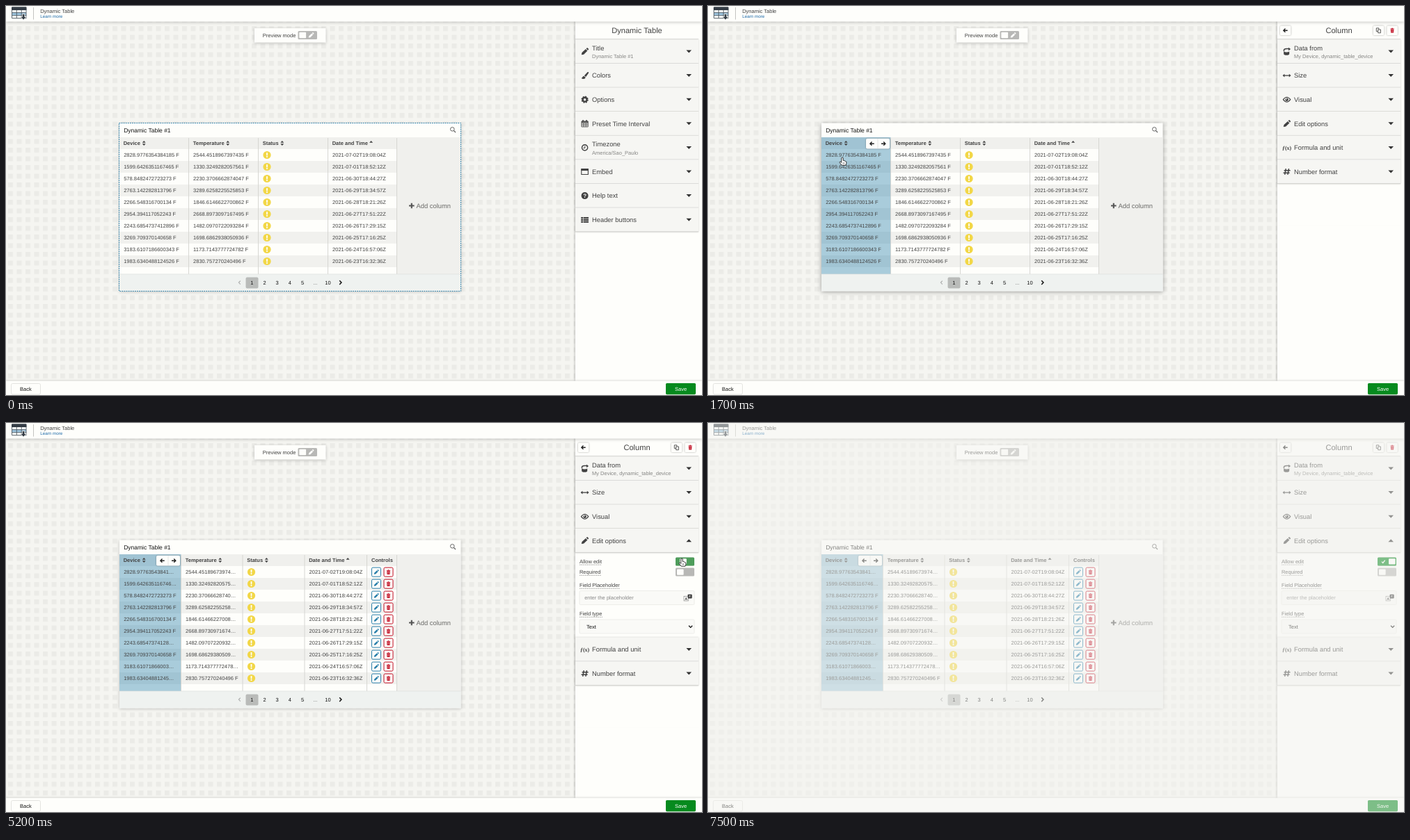
Recreate the animation shown at these times as an HTML page. Size 1000 px wide and 560 px high, loop 8 s.

```html
<!DOCTYPE html>
<html lang="en">
<head>
<meta charset="utf-8">
<title>Dynamic Table</title>
<style>
html, body { margin: 0; width: 100%; height: 100%; overflow: hidden; background: #fefefb; }
svg { display: block; width: 100vw; height: 100vh; }
text { font-family: "Liberation Sans", Arial, sans-serif; text-rendering: geometricPrecision; white-space: pre; }
.soft { filter: drop-shadow(0 1px 2px rgba(0,0,0,.22)); }
.lift { filter: drop-shadow(0 1px 3px rgba(0,0,0,.38)); }
.rows { filter: drop-shadow(0 .8px 1px rgba(0,0,0,.2)); }
.side { filter: drop-shadow(-1px 0 1.5px rgba(0,0,0,.2)); }
.btn { filter: drop-shadow(0 0 .8px rgba(0,0,0,.35)); }
</style>
</head>
<body>
<svg viewBox="0 0 1000 560" preserveAspectRatio="none">
  <defs>
    <pattern id="grid" x="3" y="4" width="12.5" height="12.5" patternUnits="userSpaceOnUse">
      <rect width="12.5" height="12.5" fill="#f5f5f1"/>
      <rect width="7" height="7" fill="#ebebe7"/>
    </pattern>
  </defs>
  <g id="scene"></g>
</svg>
<script>
const LOOP = 8000, STEP = 100;
const INK = '#424242', WHITE = '#fefefb', GREY = '#f0f0ed', ROW = '#f6f6f3';
const BLUE = '#297faa', RED = '#c00a20', GREEN = '#068a1e';

// Drawing helpers
const rect = (x, y, w, h, fill, more = '') =>
  `<rect x="${x}" y="${y}" width="${w}" height="${h}" fill="${fill}" ${more}/>`;
const text = (x, y, s, size = 7.5, fill = INK, more = '') =>
  `<text x="${x}" y="${y}" font-size="${size}" fill="${fill}" ${more}>${s}</text>`;
const fillPath = (d, fill = INK, more = '') => `<path d="${d}" fill="${fill}" ${more}/>`;
const line = (d, color = INK, width = 1, more = '') =>
  `<path d="${d}" fill="none" stroke="${color}" stroke-width="${width}" ${more}/>`;
const ring = (r, width, more = '') =>
  `<circle r="${r}" fill="none" stroke="${INK}" stroke-width="${width}" ${more}/>`;
const at = (x, y, body, scale = 1) =>
  `<g transform="translate(${x} ${y}) scale(${scale})">${body}</g>`;
const range = n => [...Array(n).keys()];
const BOLD = 'font-weight="700"', MID = 'text-anchor="middle"';

// Icons, each centred on 0,0
const pencil = (c = INK) =>
  fillPath('M-4.8 4.8l.7-3.2L1.3-3.4 3.8-.9l-5.2 5.1zM2-4.1l.8-.8q.7-.6 1.4 0l1 1q.6.7 0 1.4l-.8.8z', c);
const trash = (c = RED) =>
  fillPath('M-4-4h2.2l.6-1h2.4l.6 1H4v1.3h-8zM-3.4-2h6.8l-.5 7h-5.8z', c) +
  line('M-1.2-.6v4M1.2-.6v4', WHITE, .7);
const arrow = dir => line(`M${-3 * dir} 0H${2.6 * dir}M${.2 * dir}-2.6L${2.8 * dir} 0 ${.2 * dir} 2.6`, '#222', 1.4);
const icon = {
  pencil: pencil(),
  brush: fillPath('M5-5q1 .4.3 1.6L1.6 2-.8.2 3.8-4.8q.6-.5 1.2-.2zM-1.3.8L1 2.5Q.8 5-2 5q-2 0-3-1.4 1.5 0 1.8-1.4.4-1.4 1.9-1.4z'),
  gear: ring(2.9, 2.4) + ring(4.3, 1.7, 'stroke-dasharray="1.9 1.477"'),
  calendar: line('M-4.6-3.4h9.2v8h-9.2zM-4.6-.9h9.2M-4.6 1.8h9.2M-1.6-1v5.6M1.6-1v5.6', INK, .9) +
    line('M-4.6-2.6h9.2M-2.5-5.2v2M2.5-5.2v2', INK, 1.5),
  clock: ring(4.1, 1.4) + line('M.2-2.4V.6H-2', INK, 1),
  frame: line('M-4.8-3.8h9.6v7.8h-9.6z', INK, 1.1) + rect(-5.2, -4.4, 10.4, 3, INK),
  help: `<circle r="5" fill="${INK}"/>` + text(0, 2.9, '?', 8, WHITE, `${MID} ${BOLD}`),
  list: [-3.8, -.9, 2].map(y => rect(-5.4, y, 2.8, 2.2, INK) + rect(-2, y, 7.4, 2.2, INK)).join(''),
  data: fillPath('M-4.4-1.2v4.6q0 1.8 4 1.8t4-1.8V0q-2 1.4-5 1t-3-2.2z') +
    line('M-4-.8Q-5-4 0-4H3.6', INK, 1.7) + fillPath('M2.4-5.8L5.6-3.4 2.4-1.2z'),
  wide: line('M-4 0H4', INK, 1.3) + fillPath('M-6 0l2.8-2.4v4.8zM6 0L3.2-2.4v4.8z'),
  eye: line('M-5.2 0Q0-7 5.2 0 0 7-5.2 0z', INK, 1.1) +
    `<circle r="2.3" fill="${INK}"/><circle cx="-.7" cy="-.8" r=".8" fill="${WHITE}"/>`,
  fx: text(0, 2.6, '<tspan font-style="italic">ƒ</tspan>(x)', 8, INK, `${MID} style="font-family:'Liberation Serif',serif" ${BOLD}`),
  hash: line('M-1.3-4.4l-1.6 8.8M2.9-4.4L1.3 4.4M-4-1.7H5M-5 1.7H4', INK, 1.5),
  warn: '<circle r="5.6" fill="#f2d747"/>' + rect(-.9, -3.6, 1.8, 4.5, WHITE, 'rx=".7"') +
    `<circle cy="2.6" r="1.05" fill="${WHITE}"/>`
};
const sortIcon = (x, both) => fillPath(`M${x} 196.7h5l-2.5-2.7z`) + (both ? fillPath(`M${x} 198.2h5l-2.5 2.7z`) : '');
const caret = (y, up) => fillPath(up ? `M977.4 ${y + 2}h7.6l-3.8-4z` : `M977.4 ${y - 2}h7.6l-3.8 4z`, '#333');

// Table data
const devices = ('2828.9776354384185 1599.6426351167465 578.8482472723273 2763.142282813796 2266.548316700134 ' +
  '2954.394117052243 2243.6854737412896 3269.709370140658 3183.6107186600343 1983.6340488124526').split(' ');
const temps = ('2544.4518967397435 1330.3249282057561 2230.3706662874047 3289.6258225525853 1846.6146622700862 ' +
  '2668.8973097167495 1482.0970722093284 1698.6862938050936 1173.7143777724782 2830.757270240496').split(' ');
const dates = ('07-02T19:08:04 07-01T18:52:12 06-30T18:44:27 06-29T18:34:57 06-28T18:21:26 ' +
  '06-27T17:51:22 06-26T17:29:15 06-25T17:16:25 06-24T16:57:06 06-23T16:32:36').split(' ');

// The narrow layout cuts long values; a kerned "11" leaves room for one more digit
const value = (s, narrow) => {
  const full = s + ' F';
  return narrow && full.length > 19 ? full.slice(0, full.includes('11') ? 17 : 16) + '…' : full;
};

function table(t, tint) {
  const narrow = t >= 5200, picked = t >= 1600;
  const seps = narrow ? [251.5, 340, 429, 518.5] : [262.5, 362.5, 462.5];
  const [x1, x2, x3] = seps;
  let s = rect(163, 168.5, 490.5, 242, WHITE, `class="${picked && t < 2200 ? 'lift' : 'soft'}"`);
  s += rect(163, 189, 398.5, 17, GREY);
  s += range(5).map(i => rect(163, 223 + i * 34, 398.5, 17, '#f1f1ee')).join('');
  if (tint) s += rect(163, 189, x1 - 163, 197, BLUE, `opacity="${tint}"`);
  s += rect(561.5, 189, 92, 197, GREY) + rect(163, 386, 490.5, 24.5, '#eff2f0');
  s += line([...seps, 561.5].map(x => `M${x} 190V386`).join(''), '#d3d3cf', .9);
  s += line('M163 386H653.5', '#dcdedb', .7);

  s += text(169.2, 181.6, 'Dynamic Table #1', 8.5, '#111');
  s += at(642, 178, line('M1.5 1.5L4 4', '#666', 1.3) + '<circle cx="-.7" cy="-.7" r="2.8" fill="none" stroke="#666"/>');
  const head = (x, label, dx, both) => text(x, 200, label, 7.5, INK, BOLD) + (dx ? sortIcon(x + dx, both) : '');
  s += head(168.7, 'Device', 27, true) + head(x1 + 6.2, 'Temperature', 47.5, true) +
    head(x2 + 6.2, 'Status', 25.6, true) + head(x3 + 6.2, 'Date and Time', 53.4, false);
  if (narrow) s += head(525, 'Controls');

  s += range(10).map(i => {
    const y = 214.3 + i * 17, base = y + 2.6;
    let r = text(169.2, base, value(devices[i], narrow)) + text(x1 + 6.6, base, value(temps[i], narrow)) +
      at(x2 + 12.5, y + .2, icon.warn) + text(x3 + 6.6, base, `2021-${dates[i]}Z`);
    if (narrow) {
      const box = (x, color, glyph) =>
        rect(x, y - 6.2, 13, 13, WHITE, `rx="1.6" stroke="${color}"`) + at(x + 6.5, y + .3, glyph, .68);
      r += box(525.5, BLUE, pencil(BLUE)) + box(543, RED, trash());
    }
    return r;
  }).join('');

  if (picked) {
    const x = x1 - 35.5;
    s += rect(x, 190.7, 34, 14.8, WHITE, 'rx="2" class="btn"') + line(`M${x + 17} 191V205`, '#ddd', .7) +
      at(x + 8.7, 198.2, arrow(-1)) + at(x + 25, 198.2, arrow(1));
  }

  s += line('M579 287.5h7.6M582.8 283.7v7.6', '#555', 2.1) + text(589.5, 290.6, 'Add column', 9.375, '#6a6a68');
  s += rect(344.5, 390.5, 18, 16, '#b9bbb9', 'rx="2"');
  s += ['1', '2', '3', '4', '5', '...', '10'].map((p, i) =>
    text(353.3 + i * 18.2, 401, p, 7.5, i === 5 ? '#666' : '#111', MID)).join('');
  s += line('M336.8 395.6l-2.4 2.5 2.4 2.5', '#aaa', 1.1) + line('M479.2 395.3l2.7 2.8-2.7 2.8', '#111', 1.5);
  if (!picked) s += rect(162.5, 168.5, 491, 242, 'none', `stroke="${BLUE}" stroke-dasharray="1.8 1.3"`);
  return s;
}

const topIcon = rect(8.5, 1.8, 20.5, 16, WHITE, 'rx="1"') +
  rect(9, 9.6, 20, 4, '#9cc3dc') + line('M8.5 4V17.6H29V4M15.3 6v11.5M22.2 6v11.5M8.5 9.6H29M8.5 13.7H29', '#4d5862', .9) +
  rect(8, 1.2, 21.5, 4.8, '#343c45', 'rx="1"') +
  fillPath('M23.4 11.5h3.4v4h2.4L25.1 20 21 15.5h2.4z', '#343c45', `stroke="${WHITE}" stroke-width=".7"`);

function bars(saveHover) {
  return rect(0, 0, 1000, 22.5, WHITE, 'class="soft"') + topIcon + line('M39.5 2V19.5', '#b4b4b2', .8) +
    text(49.2, 9.8, 'Dynamic Table') + text(49.3, 17.2, 'Learn more', 6.25, '#1b69a8') +
    rect(0, 539.8, 1000, 20.2, WHITE, 'style="filter:drop-shadow(0 -1px 1px rgba(0,0,0,.13))"') +
    rect(7.5, 543.5, 42, 15.6, WHITE, 'rx="2" stroke="#dededa" stroke-width=".8"') +
    text(28.4, 553.6, 'Back', 7.5, '#111', MID) +
    rect(948, 543, 43, 16.2, saveHover ? '#06701a' : GREEN, 'rx="1.6"') +
    text(969.6, 553.6, 'Save', 7.5, WHITE, MID);
}

const preview = rect(357, 32, 102.5, 20.5, WHITE, 'class="soft"') + text(368.8, 44.6, 'Preview mode') +
  rect(419.5, 36, 27.5, 12, '#b8b8b6', 'rx="1.5"') + rect(421.3, 37.8, 9.8, 8.4, WHITE, 'rx="1"') +
  at(438.3, 42, pencil(WHITE), .75);

function row(y, glyph, label, sub, { fill = ROW, open = false } = {}) {
  const mid = y + 17.3;
  return rect(818, y, 177, 34.6, fill) + line(`M818 ${y + 34.4}H995`, '#cfcfcb', .9) +
    at(831.6, mid, icon[glyph]) + text(842, sub ? mid - 1.5 : mid + 3.3, label, 9.375) +
    (sub ? text(842, mid + 9.6, sub, 7.5, '#868684') : '') + caret(mid, open);
}
const rowY = i => 48.2 + i * 34.6;
const rows = body => `<g class="rows">${body}</g>`;
const panelTitle = s => text(906.5, 38.9, s, 11.1, INK, MID) + line('M818 48H995', '#cfcfcb', .9);

const mainPanel = panelTitle('Dynamic Table') + rows([
  ['pencil', 'Title', 'Dynamic Table #1'], ['brush', 'Colors'], ['gear', 'Options'],
  ['calendar', 'Preset Time Interval'], ['clock', 'Timezone', 'America/Sao_Paulo'],
  ['frame', 'Embed'], ['help', 'Help text'], ['list', 'Header buttons']
].map((r, i) => row(rowY(i), ...r)).join(''));

function toggle(y, p) {
  const x = 964 + 14 * p;
  return rect(962, y, 27, 12, '#b8b8b6', 'rx="1.5"') +
    rect(962, y, 27, 12, GREEN, `rx="1.5" opacity="${Math.min(1, p * 2)}"`) +
    line(`M968 ${y + 6.2}l1.7 1.8 3-3.8`, WHITE, 1.3, `opacity="${p}"`) +
    rect(x, y + 1.8, 9.6, 8.4, WHITE, 'rx="1"');
}

function options(on) {
  const label = (y, s, w) => text(823.9, y, s) + line(`M824 ${y + 2.3}h${w}`, '#555', .7, 'stroke-dasharray=".8 .8"');
  const field = y => rect(824, y, 165, 20, '#fafaf7', 'rx="1.5" stroke="#e9e9e5" stroke-width=".8"');
  return label(201.8, 'Allow edit', 32) + toggle(193.4, on) + label(217, 'Required', 31) + toggle(208.6, 0) +
    label(236, 'Field Placeholder', 58) + field(241.6) + text(831.2, 254, 'enter the placeholder', 7.5, '#888') +
    rect(974, 249.5, 6.5, 6.5, WHITE, 'stroke="#777" stroke-width=".6"') + text(977.2, 255, 'A', 5.5, INK, `${MID} ${BOLD}`) +
    rect(979.6, 246.8, 6, 5.8, '#333', 'rx=".8"') + line('M981 248.8h3.2M982.6 248v1l-1.3 2.2M982 249.5l1.8 1.8', WHITE, .5) +
    label(277, 'Field type', 33) + field(283) + text(834, 295.7, 'Text', 7.5, '#111') +
    line('M981 291.8l2.6 2.6 2.6-2.6', '#111', 1.3);
}

function columnPanel(t, open, hover) {
  const drop = 122 * open;
  const button = (x, glyph, k) => rect(x, 28.4, 15.4, 13.6, WHITE, 'rx="1.5" class="btn"') + at(x + 7.7, 35.2, glyph, k);
  const copy = line('M-1-1.6h4.6v6H-1zM-1 1.8h-3v-6h4.4v2', INK, 1.1);
  const on = t < 5200 ? 0 : t < 5300 ? .3 : t < 5400 ? .75 : 1;
  return panelTitle('Column') +
    button(822, arrow(-1), 1) + button(955.8, copy, .8) + button(975.4, trash(), .68) +
    (open ? options(on) : '') + rect(818, 186.6 + drop, 177, 130, WHITE) +
    rows(row(rowY(0), 'data', 'Data from', 'My Device, dynamic_table_device') +
      row(rowY(1), 'wide', 'Size') + row(rowY(2), 'eye', 'Visual') +
      row(rowY(3), 'pencil', 'Edit options', '', { fill: hover ? '#eeeeeb' : ROW, open: open > 0 }) +
      row(rowY(4) + drop, 'fx', 'Formula and unit') + row(rowY(5) + drop, 'hash', 'Number format'));
}

// Pointer: time, x, y
const track = [
  [600, 66, 16], [1400, 193, 218], [2100, 193, 218], [2300, 285, 212], [2400, 285, 212],
  [2900, 896, 167], [3500, 896, 167], [3800, 932, 192], [3900, 932, 192], [4500, 971, 195],
  [5800, 971, 195], [6000, 967, 259], [6100, 967, 259], [6600, 977, 546], [6900, 977, 546]
];
function pointer(t) {
  if (t < 600 || t >= 6900) return null;
  const i = track.findIndex(k => k[0] > t), [t0, x0, y0] = track[i - 1], [t1, x1, y1] = track[i];
  const u = (t - t0) / (t1 - t0), e = u * u * (3 - 2 * u);
  return { x: x0 + (x1 - x0) * e, y: y0 + (y1 - y0) * e };
}
const inside = (p, x, y, w, h) => !!p && p.x > x && p.x < x + w && p.y > y && p.y < y + h;
const hand = fillPath('M-1.2.6Q0-.8 1.2.6V4.4Q2.4 3.9 3 5 4.2 4.6 4.7 5.7 5.9 5.7 5.8 7V8.6L4.9 11.2H-.8L-3.8 7.5Q-4.2 6-2.7 6.2L-1.2 7.4z',
  '#fff', 'stroke="#222" stroke-width=".9" stroke-linejoin="round"') + line('M1 7.3v2M2.7 7.3v2', '#222', .6);
const tip = fillPath('M0 0V10L2.3 7.8 3.9 11.4 5.5 10.7 4 7.2H7z', '#111', 'stroke="#fff" stroke-width=".7"');

function scene(t) {
  const p = pointer(t);
  const overTable = inside(p, 163, 189, 399, 197), overSave = inside(p, 948, 543, 43, 17);
  const overEdit = inside(p, 818, 152, 177, 34);
  const overLink = overTable || overSave || inside(p, 818, 48, 177, 138) || inside(p, 962, 193, 27, 13);
  const tint = t >= 1700 ? .4 : t >= 1600 ? .3 : overTable ? .2 : 0;
  const open = t < 3000 ? 0 : t < 3100 ? .5 : 1;
  const fade = t < 7100 ? 0 : Math.min(.5, (t - 7000) / 1000);
  return rect(0, 22, 1000, 519, 'url(#grid)') + preview + table(t, tint) +
    rect(818, 22, 182, 518, WHITE, 'class="side"') +
    (t >= 1600 ? columnPanel(t, open, overEdit) : mainPanel) + bars(overSave) +
    (p ? at(p.x, p.y, overLink ? hand : tip) : '') +
    (fade ? rect(0, 0, 1000, 560, '#f3f4f0', `opacity="${fade}"`) : '');
}

const stage = document.getElementById('scene');
let shown = -1;
function tick() {
  const t = Math.floor(performance.now() % LOOP / STEP) * STEP;
  if (t !== shown) stage.innerHTML = scene(shown = t);
  requestAnimationFrame(tick);
}
tick();
</script>
</body>
</html>
```
